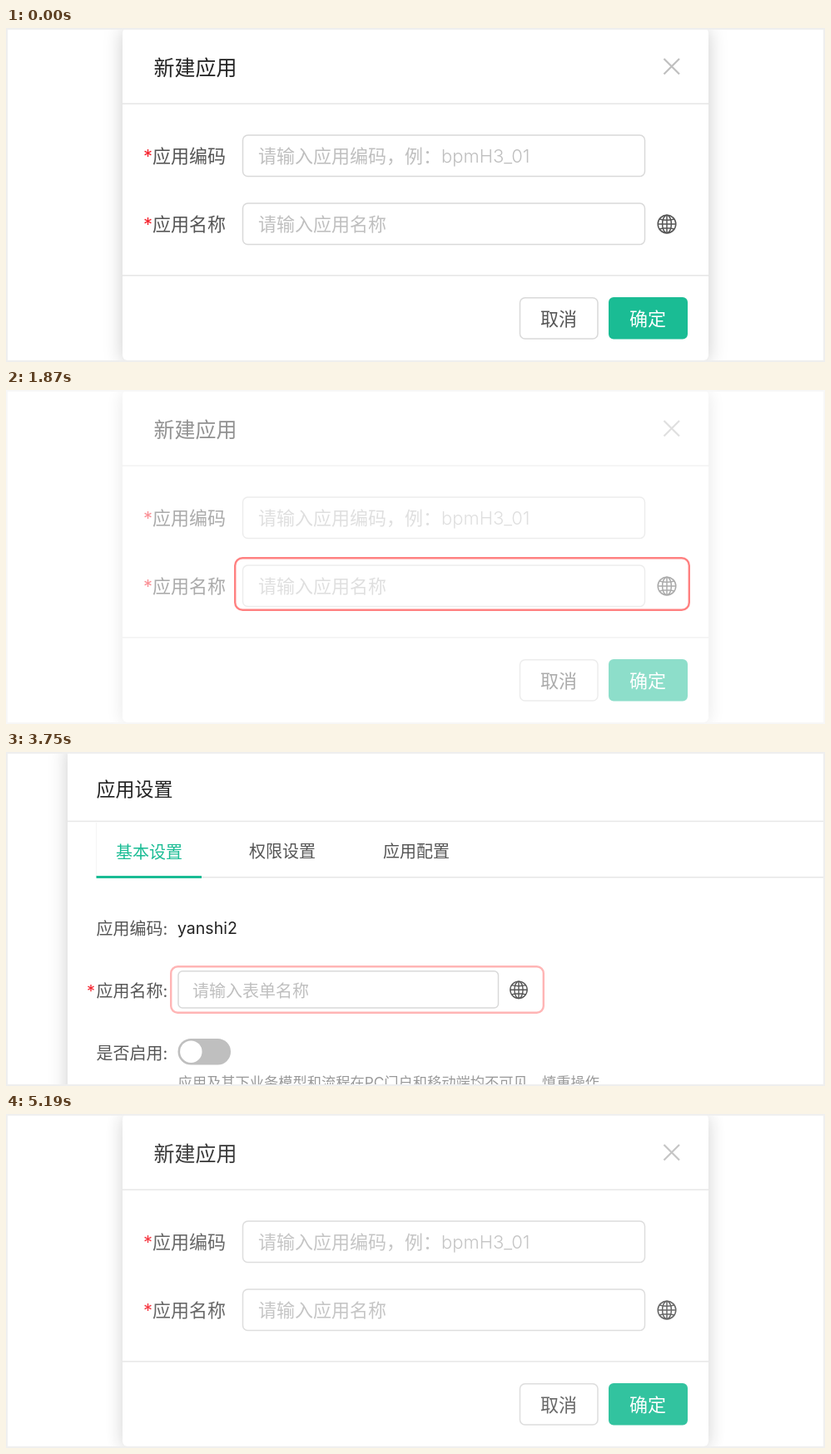
Write an HTML page that moves like this. It is 984 px wide and 402 px high and loops after 5220 ms.

```html
<!DOCTYPE html>
<html lang="zh-CN">
<head>
<meta charset="utf-8">
<title>新建应用</title>
<style>
  html, body { margin: 0; width: 100%; height: 100%; overflow: hidden; background: #fff; }
  svg { display: block; width: 984px; height: 402px; }
  text { font-family: Inter, "Noto Sans CJK SC", "Noto Sans CJK", sans-serif; fill: #555; }
  .dark { fill: #222; }
  .hint { fill: #bfbfbf; font-weight: 300; }
  .star { fill: #f5222d; }
  .line { fill: #e8e8e8; }
  .input { fill: #fff; stroke: #d9d9d9; stroke-width: 1.5; }
  .frame { fill: none; stroke: #eee; stroke-width: 2; }
  .panel { fill: #fff; filter: drop-shadow(0 2px 11px rgba(0, 0, 0, .2)); }
  .mark { fill: none; stroke-width: 2.4; }
  .m { font-size: 22px; }
  .s { font-size: 20px; }

  .create, .settings, .mark { animation: 5220ms linear infinite; }
  .create { animation-name: create; }
  .settings { animation-name: settings; }
  .create .mark { stroke: #f00; animation-name: blink-in; }
  .settings .mark { stroke: #ff4d4d; animation-name: blink-out; }

  @keyframes create {
    0%, 32.95% { opacity: 1; }
    38.7%, 94.64% { opacity: 0; }
    100% { opacity: 1; }
  }
  @keyframes settings {
    0%, 41.95% { opacity: 0; }
    50.57%, 87.36% { opacity: 1; }
    95.02%, 100% { opacity: 0; }
  }
  @keyframes blink-in {
    0%, 13.41% { opacity: 0; }
    6.7%, 20.11%, 45% { opacity: 1; }
    46%, 100% { opacity: 0; }
  }
  @keyframes blink-out {
    0%, 55.17%, 68.97%, 82.76%, 100% { opacity: 0; }
    62.07%, 75.86% { opacity: 1; }
  }
</style>
</head>
<body>
<svg viewBox="0 0 984 402">
  <defs>
    <g id="globe" fill="none" stroke="#555" stroke-width="1.5">
      <circle r="10.8"/>
      <ellipse rx="5.4" ry="10.8"/>
      <path d="M0-10.8V10.8M-10.8 0H10.8M-8.8-6Q0-3.6 8.8-6M-8.8 6Q0 3.6 8.8 6"/>
    </g>
    <clipPath id="stage"><rect x="1" y="1" width="982" height="399.5"/></clipPath>
  </defs>

  <g class="create">
    <g clip-path="url(#stage)">
      <rect class="panel" x="140" y="0" width="704" height="400" rx="6"/>
    </g>
    <rect class="frame" x="1" y="1" width="982" height="400"/>
    <text class="dark" x="177.5" y="56.5" font-size="25">新建应用</text>
    <path d="M790.5 37l18.5 18.5m0-18.5l-18.5 18.5" stroke="#bfbfbf" stroke-width="2.2"/>
    <rect class="line" x="140" y="90.3" width="704" height="1.7"/>
    <rect class="line" x="140" y="297" width="704" height="1.7"/>

    <text class="star m" x="165" y="162">*</text>
    <text class="m" x="176" y="162">应用编码</text>
    <rect class="input" x="284.5" y="129" width="483" height="49.5" rx="6"/>
    <text class="hint m" x="303" y="162">请输入应用编码，例：bpmH3_01</text>

    <text class="star m" x="165" y="244">*</text>
    <text class="m" x="176" y="244">应用名称</text>
    <rect class="input" x="284.5" y="211" width="483" height="49.5" rx="6"/>
    <text class="hint m" x="303" y="244">请输入应用名称</text>
    <use href="#globe" x="794" y="236"/>

    <rect class="input" x="617.5" y="324.7" width="93.5" height="49.3" rx="6"/>
    <text class="m" x="642" y="357.8">取消</text>
    <rect x="724" y="324" width="95" height="50.5" rx="6" fill="#1abc94"/>
    <text class="m" x="749" y="357.8" style="fill:#fff">确定</text>
    <rect class="mark" x="275.2" y="202.2" width="545.6" height="62.6" rx="9"/>
  </g>

  <g class="settings">
    <g clip-path="url(#stage)">
      <rect class="panel" x="74" y="-8" width="930" height="430"/>
      <text x="206.5" y="403.5" font-size="17.25" style="fill:#999">应用及其下业务模型和流程在PC门户和移动端均不可见，慎重操作</text>
    </g>
    <rect class="frame" x="1" y="1" width="982" height="400"/>
    <text class="dark" x="108.5" y="52.5" font-size="23">应用设置</text>
    <rect class="line" x="74" y="82.6" width="908" height="1.6"/>
    <rect x="108" y="85" width="1" height="65" fill="#f5f5f5"/>
    <rect class="line" x="109" y="150" width="873" height="1.6"/>
    <rect x="108.5" y="149" width="126.5" height="3" fill="#1abc94"/>
    <text class="s" x="132" y="127.5" font-weight="500" style="fill:#1abc94">基本设置</text>
    <text class="s" x="292" y="126.5">权限设置</text>
    <text class="s" x="453" y="126.5">应用配置</text>

    <text class="s" x="108.5" y="219.5">应用编码:</text>
    <text class="dark" x="206" y="219" font-size="19.5">yanshi2</text>

    <text class="star s" x="97" y="294.5">*</text>
    <text class="s" x="108.5" y="294.5">应用名称:</text>
    <rect class="input" x="207" y="263.7" width="384.5" height="44.3" rx="5"/>
    <text class="hint s" x="224" y="294.5">请输入表单名称</text>
    <use href="#globe" transform="translate(616 286.3) scale(.94)"/>

    <text class="s" x="108.5" y="369.5">是否启用:</text>
    <rect x="206.5" y="345" width="63.5" height="31.5" rx="15.75" fill="#bfbfbf"/>
    <circle cx="222.3" cy="360.7" r="13.2" fill="#fff"/>
    <rect class="mark" x="198.2" y="258.2" width="447.6" height="55.6" rx="8"/>
  </g>
</svg>
</body>
</html>
```
